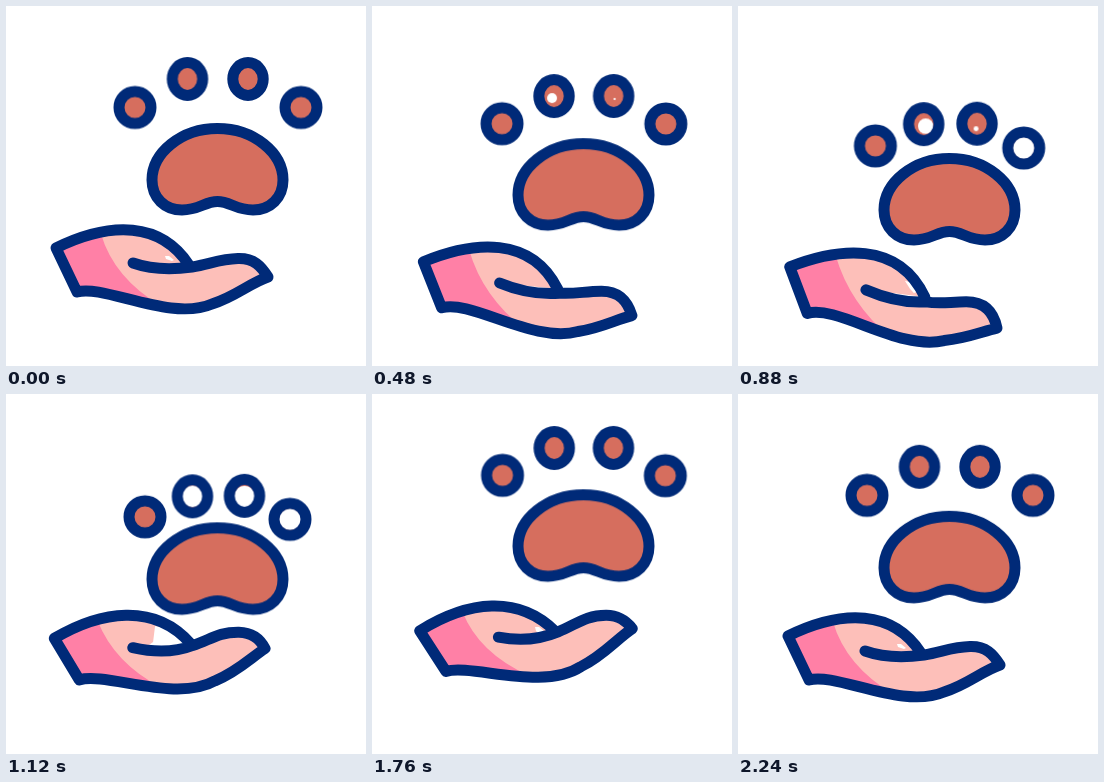
An HTML page for the animation above (2.28 s loop, 360 by 360 pixels).

```html
<!DOCTYPE html>
<html lang="en">
<head>
<meta charset="utf-8">
<title>Paw and hand</title>
<style>
html, body { margin: 0; width: 100%; height: 100%; overflow: hidden; background: #fff; }
svg { display: block; width: 100vw; height: 100vh; }

.line { fill: none; stroke: #002a78; stroke-width: 11; stroke-linecap: round; stroke-linejoin: round; }
.paw { fill: #d66e5e; }
.skin { fill: #fdbfb9; }
.cuff { fill: #ff80a6; }
.gap { fill: #fff; }

.pad, .toe, .hand, .cuff, .crease, .hole {
  animation: 2280ms cubic-bezier(.37, 0, .63, 1) infinite;
}
.pad { animation-name: bob; }
.toe { animation-name: tuck; }
.hand { animation-name: hand; }
.cuff { animation-name: cuff; }
.crease { animation-name: crease; animation-timing-function: linear; }
.hole { animation-timing-function: linear; transform: scale(0); }
.h2 { animation-name: hole2; }
.h3 { animation-name: hole3; }
.h4 { animation-name: hole4; }

@keyframes bob {
  0%, 7%, 100% { transform: translateY(0); }
  35%, 39.7% { transform: translateY(30px); }
  64.3%, 66.7% { transform: translateY(-28px); }
}

/* Toes draw in towards the pad */
@keyframes tuck {
  0%, 14%, 85.3%, 100% { transform: translate(0, 0); }
  47.4%, 53.7% { transform: translate(var(--x), var(--y)); }
}

@keyframes hand {
  0%, 4%, 96.5%, 100% {
    d: path("M127 257C144 263 164 264 186 261C204 258 214 253 232 252.5C248 252 255 260 262 271C244 277 229 291 206 298C164 316 98 278 71 286L50 242C105 215 155 216 183 259");
  }
  31.5%, 35.5% {
    d: path("M128 286C146 294 166 300 188 299C202 302 212 300 228 300C248 300 256 312 259 327C244 330 229 336 206 338C160 348 100 300 69 309L52 262C100 244 161 236 187 294");
  }
  59.5%, 61.4% {
    d: path("M126 233C146 235 168 233 186 221C204 211 212 198 236 198.5C246 199 253 202 259 208C246 221 232 241 211 254C176 284 102 264 76 271L46 233C90 200 140 190 183 221");
  }
}

@keyframes cuff {
  0%, 4%, 96.5%, 100% { d: path("M50 242Q72 230 95 228Q108 272 155 300Q110 290 71 286Z"); }
  31.5%, 35.5% { d: path("M52 262Q75 253 98 251Q112 300 152 334Q108 310 69 309Z"); }
  59.5%, 61.4% { d: path("M46 233Q65 217 87 210Q106 250 158 268Q118 270 76 271Z"); }
}

@keyframes crease {
  0%, 4%, 98%, 100% { d: path("M159 250L163 250L168 254L166 255L160 253Z"); }
  21.05% { d: path("M174 272L180 274L186 285L184 284L180 280Z"); }
  38.6% { d: path("M167 275L174 277L182 285L176 287L172 283Z"); }
  49.1% { d: path("M149 232L168 236L186 256L136 256L147 248Z"); }
  63.2% { d: path("M163 218L168 220L174 224L168 226L164 223Z"); }
  77.2% { d: path("M163 233L167 233L173 238L166 239L164 237Z"); }
}

@keyframes hole2 {
  0%, 14%, 72%, 100% { transform: scale(0); }
  21.05% { transform: translate(-2px, 2px) scale(.45); }
  38.6% { transform: translate(2px, 2px) scale(.7); }
  49.1% { transform: translate(0, 0) scale(1); }
  63.2% { transform: translate(0, 3px) scale(.9); }
}
@keyframes hole3 {
  0%, 19%, 72%, 100% { transform: scale(0); }
  21.05% { transform: translate(1px, 3px) scale(.1); }
  38.6% { transform: translate(-1px, 5px) scale(.22); }
  49.1% { transform: translate(0, 1px) scale(1); }
  63.2% { transform: translate(-1px, 4px) scale(.85); }
}
@keyframes hole4 {
  0%, 24%, 72%, 100% { transform: scale(0); }
  38.6%, 49.1% { transform: translate(0, 0) scale(1); }
  63.2% { transform: translate(0, 1.5px) scale(.95); }
}
</style>
</head>
<body>
<svg viewBox="0 0 360 360">
  <path class="hand skin"/>
  <path class="cuff"/>
  <path class="crease gap"/>
  <path class="hand line"/>

  <g class="pad">
    <path class="line" style="fill:#d66e5e" d="M211.5 122.5C248 122.5 277 147 277 174C277 192 264 204 247 204C230 204 224 195.5 211.5 195.5C199 195.5 193 204 176 204C159 204 146 192 146 174C146 147 175 122.5 211.5 122.5Z"/>
    <g transform="translate(129 101.5)">
      <g class="toe" style="--x:10px;--y:10px">
        <circle class="paw" r="16"/>
        <circle class="line" r="16"/>
      </g>
    </g>
    <g transform="translate(181.5 73)">
      <g class="toe" style="--x:5px;--y:18px">
        <ellipse class="paw" rx="15.2" ry="16.4"/>
        <circle class="hole h2 gap" r="11"/>
        <ellipse class="line" rx="15.2" ry="16.4"/>
      </g>
    </g>
    <g transform="translate(242 73)">
      <g class="toe" style="--x:-3.5px;--y:17.5px">
        <ellipse class="paw" rx="15.2" ry="16.4"/>
        <circle class="hole h3 gap" r="11"/>
        <ellipse class="line" rx="15.2" ry="16.4"/>
      </g>
    </g>
    <g transform="translate(295 101.5)">
      <g class="toe" style="--x:-11px;--y:12.5px">
        <circle class="paw" r="16"/>
        <circle class="hole h4 gap" r="11"/>
        <circle class="line" r="16"/>
      </g>
    </g>
  </g>
</svg>
</body>
</html>
```
